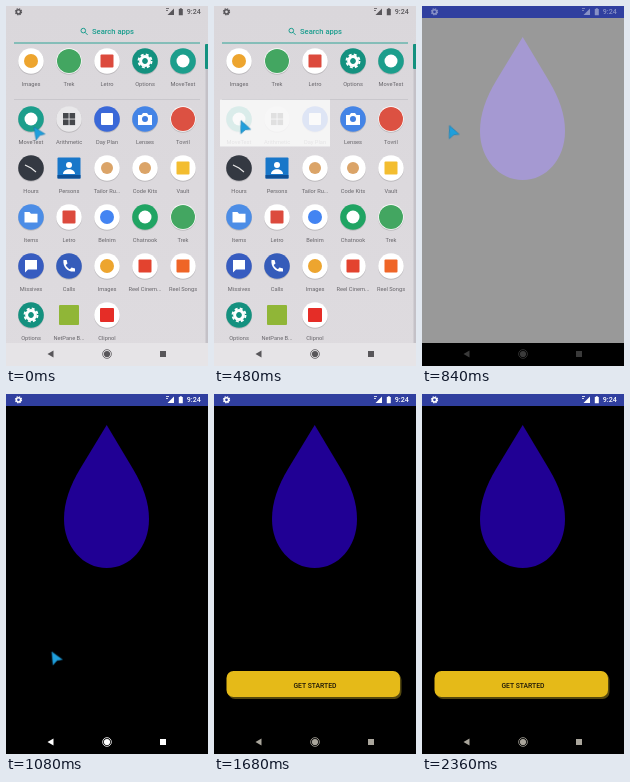
Animation, 202 px wide and 360 px high, one loop 2.52 s. Source, as an HTML page:

```html
<!DOCTYPE html>
<html lang="en">
<head>
<meta charset="utf-8">
<title>App launch</title>
<style>
  html, body { margin: 0; width: 100%; height: 100%; overflow: hidden; background: #000; }
  svg, .layer { position: absolute; left: 0; top: 0; width: 202px; height: 360px; display: block; }
  text { font-family: Roboto, sans-serif; text-anchor: middle; }
  .label { font-size: 5.7px; fill: #67656a; }
  .reveal-x, .reveal-y, .scene, .cursor, .button, .status, .nav {
    animation: 2520ms linear infinite both;
  }
  .reveal-x { animation-name: reveal-x, appear; }
  .reveal-y { animation-name: reveal-y; }
  .scene { animation-name: scene; }
  .cursor { animation-name: cursor; }
  .button { animation-name: button; }
  .status { animation-name: status; }
  .nav { animation-name: nav; }

  /* The window grows out of the tapped icon: wide first, then tall. */
  @keyframes reveal-x {
    0%, 16.667% { clip-path: inset(0 164px 0 12px); animation-timing-function: cubic-bezier(.333, 1, .667, 1); }
    29.365%, 100% { clip-path: inset(0 0 0 0); }
  }
  @keyframes reveal-y {
    0%, 16.865% { clip-path: inset(100px 0 234px 0); animation-timing-function: cubic-bezier(.333, 0, .667, .333); }
    23.194% { clip-path: inset(50px 0 117px 0); animation-timing-function: cubic-bezier(.333, .667, .667, 1); }
    29.524%, 100% { clip-path: inset(0 0 0 0); }
  }
  @keyframes appear {
    0%, 16.667% { opacity: 0; }
    19.048% { opacity: .86; }
    22%, 100% { opacity: 1; }
  }
  @keyframes scene {
    0%, 30.159% { opacity: 0; }
    38.492%, 100% { opacity: 1; }
  }
  @keyframes cursor {
    0% { transform: translate(28px, 121px) rotate(-4deg); }
    15%, 19.048% { transform: translate(27px, 114.5px) rotate(6deg); }
    25%, 34.921% { transform: translate(27.5px, 119.5px) rotate(6deg); animation-timing-function: cubic-bezier(.333, 0, .667, .333); }
    46.032%, 100% { transform: translate(63px, 388px) rotate(-6deg); }
  }
  @keyframes button {
    0%, 46.032% { transform: translateY(60px); opacity: 0; animation-timing-function: cubic-bezier(.333, .667, .667, 1); }
    63.492%, 100% { transform: none; opacity: 1; }
  }
  @keyframes status {
    0%, 23% { color: #58565a; }
    27%, 30.159% { color: #77757c; }
    33.333% { color: #8790c6; }
    38.492%, 100% { color: #fff; }
  }
  @keyframes nav {
    0%, 28.5% { color: #58565a; }
    30.159%, 33.333% { color: #383838; }
    38.492%, 46.032% { color: #fff; }
    54%, 100% { color: #aaa69c; }
  }
</style>
</head>
<body>
<svg id="home" viewBox="0 0 202 360">
  <defs>
    <linearGradient id="wall" x2="0" y2="1">
      <stop offset="0" stop-color="#dad7db"/>
      <stop offset="1" stop-color="#dedbdf"/>
    </linearGradient>
  </defs>
  <rect width="202" height="360" fill="url(#wall)"/>
  <rect y="337" width="202" height="23" fill="#e6e4e7"/>
  <g fill="none" stroke="#1b9d8e">
    <circle cx="77.3" cy="24.6" r="2.3"/>
    <path d="M79 26.3l2.6 2.6"/>
    <path d="M8 37H194" stroke-width=".9"/>
  </g>
  <text x="107" y="28" font-size="7.6" font-weight="500" fill="#1b9d8e">Search apps</text>
  <path d="M8 93.5H194" stroke="#c6c3c8" stroke-width=".8"/>
  <rect x="199.5" y="38" width="2.5" height="299" fill="#c4c1c7"/>
  <rect x="199" y="38" width="4" height="25" rx="1" fill="#14917f"/>
</svg>

<div class="layer reveal-x"><div class="layer reveal-y">
  <svg viewBox="0 0 202 360">
    <rect width="202" height="360" fill="#fafafa"/>
    <rect width="202" height="12" fill="#303f9f"/>
    <rect y="337" width="202" height="23"/>
    <g class="scene">
      <rect y="12" width="202" height="325"/>
      <path fill="#200094" d="M100.7 31L74 75C64 92 58 108 58 125C58 153 77 174 100.7 174S143 153 143 125C143 108 137 92 127 75Z"/>
    </g>
    <g class="button">
      <rect x="14" y="279" width="173.5" height="26" rx="7" fill="#54480f"/>
      <rect x="12.5" y="277" width="173.5" height="26" rx="7" fill="#e5ba18"/>
      <text x="101" y="294.4" font-size="6.8" font-weight="500" fill="#1c1708">GET STARTED</text>
    </g>
    <rect y="337" width="202" height="23"/>
  </svg>
</div></div>

<svg viewBox="0 0 202 360">
  <g class="status" fill="currentColor">
    <g fill="none" stroke="currentColor">
      <circle cx="12.5" cy="5.8" r="2.1" stroke-width="1.5"/>
      <circle cx="12.5" cy="5.8" r="3.1" stroke-width="1.1" stroke-dasharray="1.4 1.03"/>
    </g>
    <path d="M168 2.5V9h-6.5z"/>
    <path d="M160 2.5h3M160 4.5h2" stroke="currentColor" stroke-width=".8"/>
    <path d="M172.8 3h1v-.8h2V3h1v6.2h-4z"/>
    <text x="187.8" y="8.4" font-size="7.1" font-weight="500">9:24</text>
  </g>
  <g class="nav" fill="currentColor">
    <path d="M41.5 348l6-3.6v7.2z"/>
    <circle cx="101" cy="348" r="3.1"/>
    <circle cx="101" cy="348" r="4.4" fill="none" stroke="currentColor" stroke-width=".8"/>
    <rect x="154" y="345" width="6" height="6"/>
  </g>
  <path class="cursor" d="M0 0L10.5 7.8L5.2 8.8L1.2 13.2Z" fill="#1f9fdc" stroke="#1579ad" stroke-width=".6"/>
</svg>

<script>
  const dot = (r, fill) => `<circle r="${r}" fill="${fill}"/>`;
  const box = (w, h, fill) => `<rect x="${-w / 2}" y="${-h / 2}" width="${w}" height="${h}" rx="1" fill="${fill}"/>`;
  const glyph = d => `<path d="${d}" fill="#fff"/>`;
  const disc = (fill, mark) =>
    `<circle cy=".8" r="13" fill="#000" opacity=".14"/>${dot(12.8, fill)}${mark}`;

  const gear = `<g fill="none" stroke="#fff"><circle r="4.4" stroke-width="3"/>
    <circle r="6.5" stroke-width="1.9" stroke-dasharray="2.9 2.205"/></g>`;
  const keys = [[-6, -6], [.5, -6], [-6, .5], [.5, .5]]
    .map(([x, y]) => `<rect x="${x}" y="${y}" width="5.6" height="5.6" fill="#46484c"/>`).join("");
  const hands = '<path d="M-6 -3L0 0L5 4" fill="none" stroke="#e8e8e8" stroke-width="1.2"/>';
  const lens = glyph("M-7 -4h3.5l1.5 -2h4l1.5 2H7V6H-7z") + dot(3, "#3f7fe2");
  const person = box(23, 21, "#1877c9") + '<path d="M-11.5 7H11.5V10.5H-11.5z" fill="#0f4f94"/>' +
    '<circle cy="-3" r="3" fill="#fff"/>' + glyph("M-6 6C-6 -.5 6 -.5 6 6z");
  const folder = glyph("M-6.5 -5h5l1.5 1.7h6.5V5.5h-13z");
  const bubble = glyph("M-6 -6H6V3.5H-3L-6 6.5z");
  const handset = glyph("M-5.5 -6h3l1 3.5l-1.8 1.6c1 2 2.4 3.4 4.2 4.2L2.5 1.5L6 2.5v3C-1 6.5 -6.5 1 -5.5 -6z");

  const apps = {
    snaps: ["Images", disc("#fff", dot(7, "#eda52f"))],
    roam: ["Trek", disc("#fff", dot(12, "#43a661"))],
    post: ["Letro", disc("#fff", box(13, 13, "#dc4a3d"))],
    prefs: ["Options", disc("#14917f", gear)],
    test: ["MoveTest", disc("#1c9e8c", dot(6.5, "#fff"))],
    sums: ["Arithmetic", disc("#e9e8ea", keys)],
    days: ["Day Plan", disc("#3a68d8", box(12, 12, "#fff"))],
    lens: ["Lenses", disc("#4484e6", lens)],
    web: ["Tovril", disc("#fff", dot(12, "#dc5142"))],
    hours: ["Hours", disc("#343942", hands)],
    people: ["Persons", person],
    tailor: ["Tailor Ru...", disc("#fff", dot(6, "#dba468"))],
    kits: ["Code Kits", disc("#fff", dot(6, "#dba468"))],
    vault: ["Vault", disc("#fff", box(13, 13, "#f3bd30"))],
    items: ["Items", disc("#4c8de6", folder)],
    find: ["Belnim", disc("#fff", dot(7, "#4384f2"))],
    chat: ["Chatnook", disc("#20a463", dot(6.5, "#fff"))],
    notes: ["Missives", disc("#375cc0", bubble)],
    calls: ["Calls", disc("#355cba", handset)],
    reel: ["Reel Cinem...", disc("#fff", box(13, 13, "#e3432f"))],
    songs: ["Reel Songs", disc("#fff", box(13, 13, "#ef6527"))],
    pane: ["NetPane B...", box(20, 20, "#90b637")],
    clips: ["Clipnol", disc("#fff", box(14, 14, "#e52d27"))]
  };
  const rows = [
    [55, "snaps roam post prefs test"],
    [113, "test sums days lens web"],
    [162, "hours people tailor kits vault"],
    [211, "items post find chat roam"],
    [260, "notes calls snaps reel songs"],
    [309, "prefs pane clips"]
  ];

  const cell = (id, x, y) => {
    const [name, icon] = apps[id];
    return `<g transform="translate(${x} ${y})">${icon}<text class="label" y="24.5">${name}</text></g>`;
  };
  document.getElementById("home").insertAdjacentHTML("beforeend",
    rows.map(([y, ids]) => ids.split(" ").map((id, i) => cell(id, 25 + 38 * i, y)).join("")).join(""));
</script>
</body>
</html>
```
